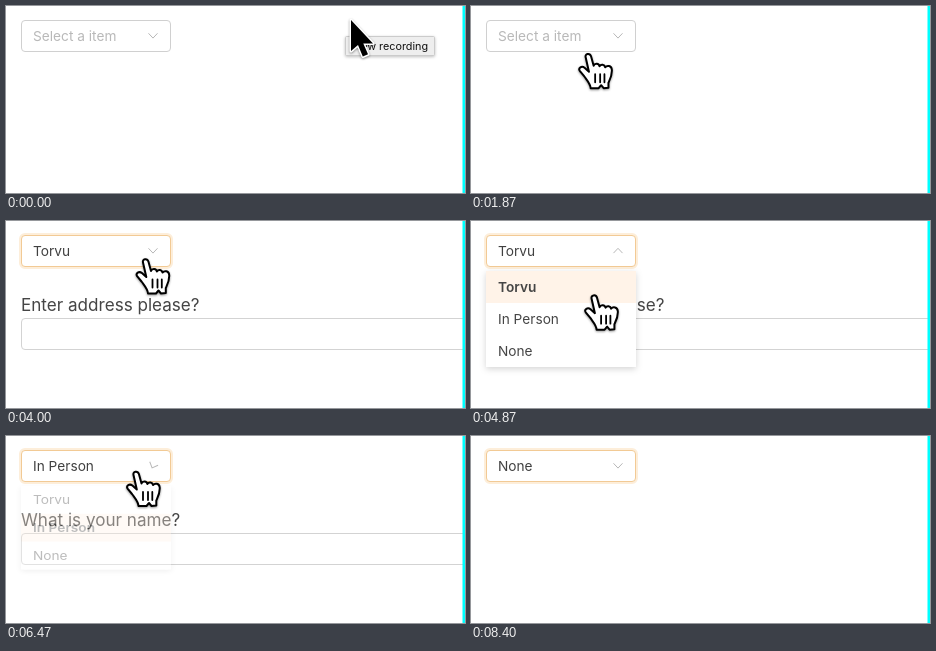
Animation of 459x187 px, one loop 9590 ms. Source, as an HTML page:

```html
<!DOCTYPE html>
<html lang="en">
<head>
<meta charset="utf-8">
<style>
  html, body { margin: 0; width: 100%; height: 100%; overflow: hidden; background: #fff; }
  svg { display: block; }
  text { font: 13.7px Inter, "Liberation Sans", sans-serif; fill: #454545; }
  #label { font-size: 17.1px; }
  #tip text { font-size: 10.8px; fill: #111; }
  #tip { filter: drop-shadow(0 1px 1.5px rgba(0,0,0,.25)); }
  #menu { filter: drop-shadow(0 2px 3px rgba(0,0,0,.17)); }
  #cursor { filter: drop-shadow(0 1.5px 1.2px rgba(0,0,0,.4)); }
</style>
</head>
<body>
<svg width="459" height="187" viewBox="0 0 459 187">
  <rect width="459" height="187" fill="#fff"/>
  <g id="form">
    <text id="label" x="15" y="90"></text>
    <rect id="input" x="15.5" y="97.5" width="470" height="31" rx="3.5" fill="#fff"/>
  </g>
  <rect id="glow" x="14.5" y="13.5" width="151" height="33" rx="4.5" fill="none" stroke="#fdeeda" stroke-width="3"/>
  <rect id="select" x="15.5" y="14.5" width="149" height="31" rx="3.5" fill="#fff"/>
  <text id="value" x="27" y="35"></text>
  <path id="chevron" d="M-4.5 -2.4L0 2.4L4.5 -2.4" fill="none" stroke="#b8b8b8"/>
  <g id="menu">
    <rect width="150" height="96" rx="4" fill="#fff"/>
  </g>
  <g id="tip">
    <rect x="339.5" y="30.5" width="89" height="19" rx="1" fill="#eee" stroke="#cbcbcb"/>
    <text x="347" y="44">New recording</text>
  </g>
  <rect x="456.5" width="2.5" height="187" fill="#0ff"/>
  <g id="cursor" stroke-linejoin="round" stroke-linecap="round">
    <path id="arrow" d="M0 0V31L7 25L11.8 36.5L17 34.3L12.3 23.5H22Z" stroke="#fff" stroke-width="3" paint-order="stroke"/>
    <g id="hand" fill="#fff" stroke="#000" stroke-width="2">
      <path d="M-2.5 4C-3.4 .2 1.7 -.6 2.9 3L5.5 12.5C6.5 9.8 10.8 9.8 11.4 13C12.8 10.7 16.3 11 17 14C18.8 12 23.3 12 23.7 16.5C24.1 22 22.4 25 20.3 29.5V34.5L15.5 35L13 32L10.5 35H2.5C2.3 30.5 -.8 27.5 -4 23L-8.4 17.6C-10.2 14.7 -6.4 12.3 -3.6 14.6L.8 18.5Z"/>
      <path d="M7 21V29M12 21V29M16.3 21V29" fill="none" stroke-width="1.8"/>
    </g>
    <g id="beam" fill="none">
      <path id="beamHalo" d="M-7 -16Q0 -16 0 -10Q0 -16 7 -16M0 -10V10M-7 16Q0 16 0 10Q0 16 7 16M-3 0H3" stroke="#fff" stroke-width="5"/>
      <path id="beamLine" stroke="#000" stroke-width="2.8"/>
    </g>
  </g>
</svg>
<script>
const LOOP = 9590, ROW = 32, MENU_TOP = 50;
const OPTIONS = ['Torvu', 'In Person', 'None'];
const LABELS = ['Enter address please?', 'What is your name?'];
const VISITS = [
  { open: 2380, pick: 3320 },
  { open: 4520, pick: 5350 },
  { open: 6450, pick: 7520 }
];

const SELECT = { x: 130, y: 35 }, EXIT = { x: 364, y: 4 };
const START = { x: 345, y: 14 };
// Pointer moves: each eases from wherever the last one ended.
const MOVES = [
  { from: 600, to: 1333, x: 117, y: 49.5, sag: 55 },
  { from: 1845, to: 2130, x: 118, y: 34 },
  { from: 2470, to: 2800, x: 119, y: 65 },
  { from: 3470, to: 4000, x: 139.5, y: 37.5 },
  { from: 4600, to: 5467, x: 108, y: 107 },
  { from: 5600, to: 6200, ...SELECT },
  { from: 6530, to: 7330, x: 109, y: 147 },
  { from: 7533, to: 7800, x: 99, y: 142 },
  { from: 7933, to: 8333, ...EXIT }
];

const $ = id => document.getElementById(id);
const set = (el, attrs) => { for (const k in attrs) el.setAttribute(k, attrs[k]); };
const show = (id, on) => set($(id), { visibility: on ? 'visible' : 'hidden' });
const clamp = (v, lo = 0, hi = 1) => Math.min(hi, Math.max(lo, v));
const easeOut = (p, power) => 1 - (1 - p) ** power;

set($('beamLine'), { d: $('beamHalo').getAttribute('d') });

function add(tag, attrs) {
  const el = document.createElementNS('http://www.w3.org/2000/svg', tag);
  set(el, attrs);
  return $('menu').appendChild(el);
}
const rows = OPTIONS.map((name, i) => {
  const back = add('rect', { y: i * ROW, width: 150, height: ROW });
  const text = add('text', { x: 12, y: i * ROW + 21 });
  text.textContent = name;
  return { back, text };
});

function pointerAt(t) {
  return MOVES.reduce((at, { from, to, x, y, sag = 0 }) => {
    const k = easeOut(clamp((t - from) / (to - from)), 2);
    return {
      x: at.x + (x - at.x) * k,
      y: at.y + (y - at.y) * k + sag * Math.sin(Math.PI * k)
    };
  }, START);
}

function menuAt(t) {
  const visit = VISITS.filter(v => t >= v.open).pop();
  if (!visit) return { open: false, shown: 0, turn: 0 };
  const open = t < visit.pick;
  const since = t - (open ? visit.open : visit.pick);
  const spin = easeOut(clamp(since / 300), 2.3);
  const p = clamp(since / 200);
  return {
    open,
    shown: open ? easeOut(p, 5) : 1 - p ** 5,
    turn: 180 * (open ? spin : 1 - spin)
  };
}

function pointerShape({ x, y }, menuOpen, hasForm) {
  const reach = menuOpen ? 148 : 49;
  if (x < 165 && y < reach) return 'hand';
  return hasForm && y > 74 && y < 129 ? 'beam' : 'arrow';
}

function draw(t) {
  const pointer = pointerAt(t), { x, y } = pointer;
  const menu = menuAt(t);
  const choice = VISITS.filter(v => t >= v.pick).length - 1;
  const marked = VISITS.filter(v => t >= v.open).length - 2;
  const hasForm = choice in LABELS;
  const shape = pointerShape(pointer, menu.open, hasForm);
  const focused = t >= VISITS[0].open;

  show('tip', t < 1460);
  show('glow', focused);
  set($('select'), { stroke: focused ? '#f2ca95' : t > 1900 ? '#f5d3aa' : '#d0d0d0' });
  $('value').textContent = choice < 0 ? 'Select a item' : OPTIONS[choice];
  $('value').style.fill = choice < 0 ? '#b9b9b9' : '#404040';
  set($('chevron'), { transform: `translate(147 29.7) rotate(${menu.turn})` });

  show('form', hasForm);
  $('label').textContent = LABELS[choice] || '';
  set($('input'), { stroke: shape === 'beam' && y > 97 ? '#e3d0b6' : '#d3d3d3' });

  set($('menu'), {
    transform: `translate(15 ${MENU_TOP}) scale(1 ${0.8 + 0.2 * menu.shown})`,
    opacity: menu.shown,
    visibility: menu.shown > 0.01 ? 'visible' : 'hidden'
  });
  const active = y < MENU_TOP ? Math.max(0, marked) : clamp(Math.floor((y - MENU_TOP) / ROW), 0, 2);
  rows.forEach(({ back, text }, i) => {
    set(back, { fill: i === active ? '#fff3e8' : i === marked ? '#fafafa' : '#fff' });
    text.style.fontWeight = i === marked ? 600 : 400;
  });

  const visible = t < 8390;
  set($('cursor'), { transform: `translate(${x} ${y})` });
  for (const id of ['arrow', 'hand', 'beam']) show(id, visible && id === shape);
}

// The picture advances 15 times per second.
const start = performance.now();
function tick(now) {
  const t = Math.max(0, now - start) % LOOP;
  draw(Math.floor(t * 0.015 + 0.1) / 0.015);
  requestAnimationFrame(tick);
}
draw(0);
requestAnimationFrame(tick);
</script>
</body>
</html>
```
